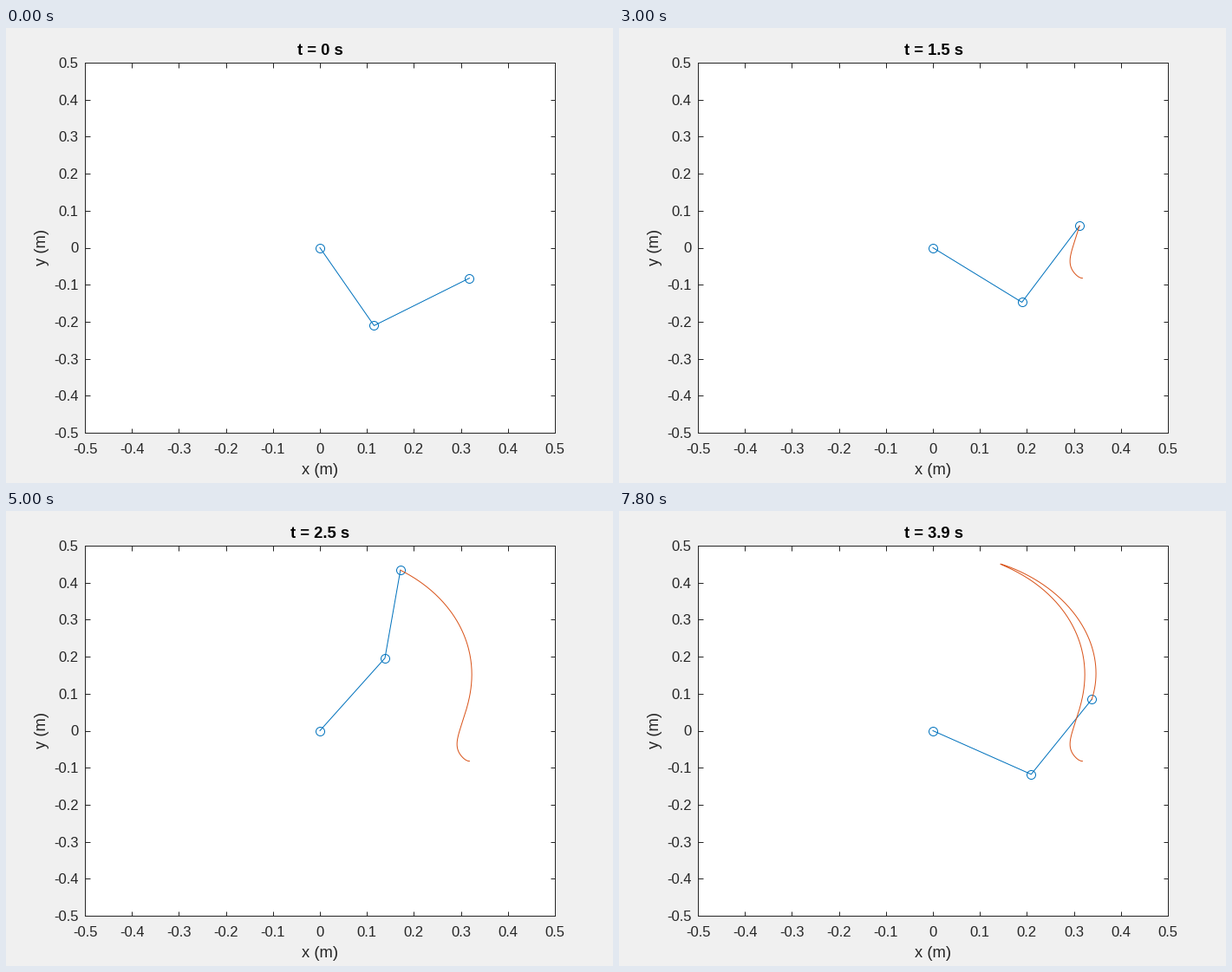
Recreate the animation shown at these times as a matplotlib script. Size 700 px wide and 525 px high, loop 8 s.

```python
import numpy as np
import matplotlib.pyplot as plt
from matplotlib.animation import FuncAnimation

W, H, DPI = 700, 525, 100
PX = 72 / DPI                      # one pixel in points
LEFT, RIGHT, TOP, BOTTOM = 91, 633, 40, 467
LINK = 0.24                        # length of each arm segment, m
DT = 0.1                           # simulated seconds per frame
FRAMES = 40
FINE = 10                          # trail samples per frame
BLUE, RED, INK = "#0072BD", "#D95319", "#262626"

# Key poses of the swing: time, upper arm angle, forearm angle (degrees)
POSES = np.array([
    (0.0, -61.3, 32.3), (0.7, -62.8, 36.9), (1.1, -58.3, 46.3),
    (1.5, -37.9, 59.3), (1.9, -0.5, 71.7), (2.5, 54.8, 82.1),
    (2.9, 60.4, 81.2), (3.4, 24.8, 71.8), (3.9, -29.4, 57.5)])


def spline(x, y, t):
    """Cubic spline through (x, y), starting at rest, free at the end."""
    n, h = len(x), np.diff(x)
    slope = np.diff(y) / h
    a, b = np.eye(n), np.zeros(n)
    a[-1, -2:] = 1, 2
    b[-1] = 3 * slope[-1]
    for i in range(1, n - 1):
        a[i, i - 1:i + 2] = h[i], 2 * (h[i - 1] + h[i]), h[i - 1]
        b[i] = 3 * (h[i] * slope[i - 1] + h[i - 1] * slope[i])
    v = np.linalg.solve(a, b)
    i = np.clip(np.searchsorted(x, t, side="right") - 1, 0, n - 2)
    s = (t - x[i]) / h[i]
    return (y[i] * (1 + 2 * s) * (1 - s) ** 2 + y[i + 1] * s ** 2 * (3 - 2 * s)
            + h[i] * s * (1 - s) * (v[i] * (1 - s) - v[i + 1] * s))


def segment(angles, t):
    a = np.radians(spline(POSES[:, 0], angles, t))
    return LINK * np.array([np.cos(a), np.sin(a)])


times = np.arange((FRAMES - 1) * FINE + 1) * DT / FINE
elbow = segment(POSES[:, 1], times)
hand = elbow + segment(POSES[:, 2], times)

plt.rcParams["font.family"] = "Liberation Sans"
fig = plt.figure(figsize=(W / DPI, H / DPI), dpi=DPI, facecolor="#F0F0F0")
ax = fig.add_axes([LEFT / W, 1 - BOTTOM / H, (RIGHT - LEFT) / W, (BOTTOM - TOP) / H])
ax.set(xlim=(-0.5, 0.5), ylim=(-0.5, 0.5))
ticks = np.arange(-5, 6) / 10
ax.set_xticks(ticks)
ax.set_yticks(ticks)
ax.tick_params(direction="in", length=5.5 * PX, width=PX, color=INK, top=True,
               right=True, labelbottom=False, labelleft=False)
for spine in ax.spines.values():
    spine.set(color=INK, linewidth=PX)


def put(x, y, text, size, ha="center", color=INK, **kw):
    return fig.text(x / W, 1 - y / H, text, fontsize=size * PX, ha=ha,
                    va="baseline", color=color, **kw)


for v in ticks:
    label = f"{v:g}"
    put(LEFT + (v + 0.5) * (RIGHT - LEFT), 491, label, 16.67)
    put(83.5, BOTTOM - (v + 0.5) * (BOTTOM - TOP) + 6, label, 16.67, ha="right")
put(362.5, 515, "x (m)", 18.33)
put(46, 253, "y (m)", 18.33, rotation=90, rotation_mode="anchor")
title = put(362.5, 31, "", 18.33, color="black", weight="bold")

arm, = ax.plot([], [], "-o", color=BLUE, lw=PX, ms=10 * PX, mfc="none", mew=PX)
trail, = ax.plot([], [], color=RED, lw=PX)


def draw(n):
    k = n * FINE
    arm.set_data([0, elbow[0, k], hand[0, k]], [0, elbow[1, k], hand[1, k]])
    trail.set_data(hand[0, :k + 1], hand[1, :k + 1])
    title.set_text(f"t = {n * DT:g} s")
    return arm, trail, title


anim = FuncAnimation(fig, draw, frames=FRAMES, interval=200, repeat=True,
                     repeat_delay=0)
plt.show()
```
